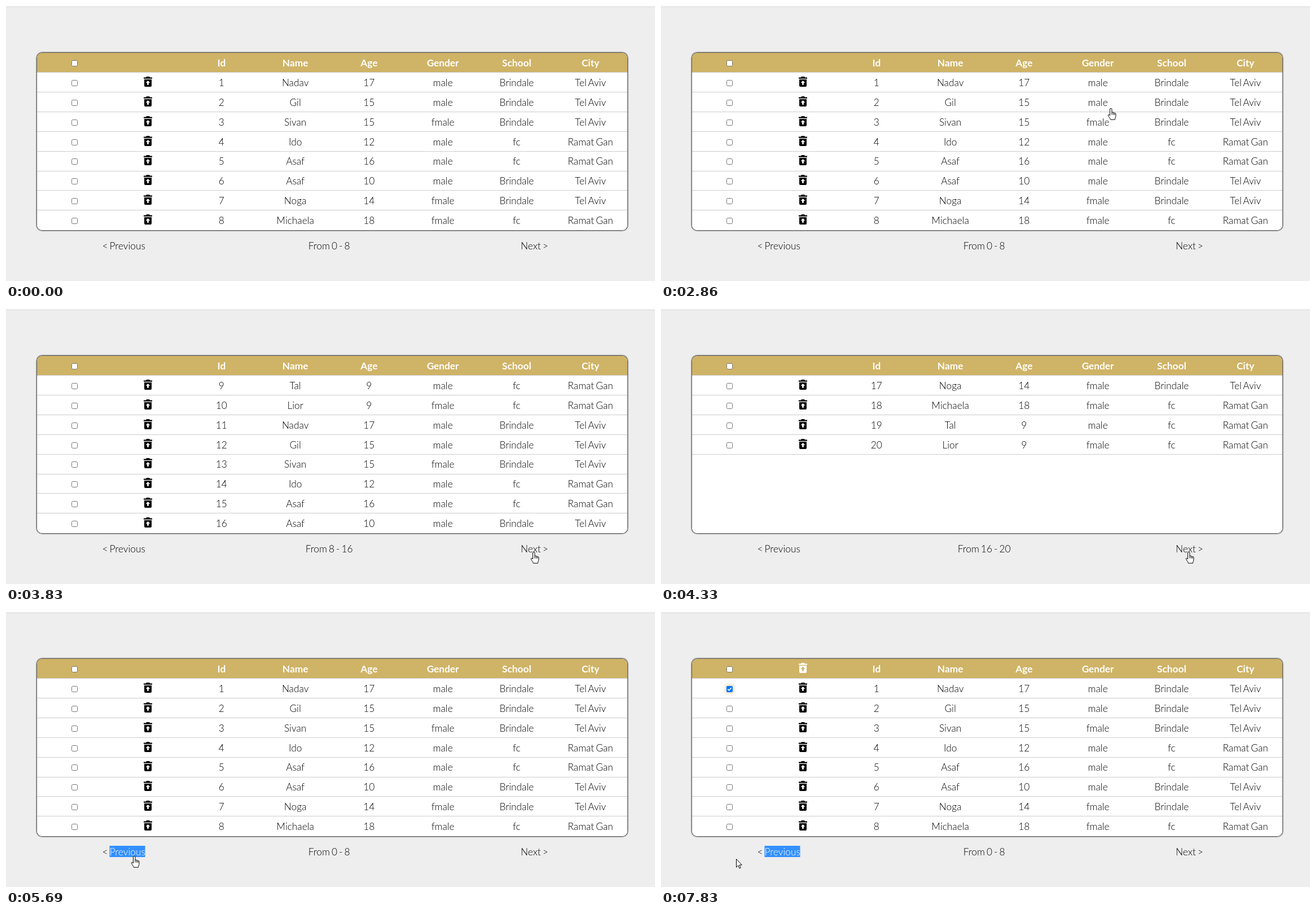
Animation, 1150 px wide and 487 px high, one loop 8000 ms. Source, as an HTML page:

```html
<!DOCTYPE html>
<html lang="en">
<head>
<meta charset="utf-8">
<title>Paged table</title>
<style>
  html, body { margin: 0; width: 100%; height: 100%; overflow: hidden; background: #eee; }
  #frame {
    position: absolute; left: 55px; top: 83px; width: 1046px; height: 314px;
    border-radius: 9px; overflow: hidden; box-shadow: 0 0 2px 1px #222;
    background: linear-gradient(#cfb366 35px, #fff 35px);
  }
  svg {
    position: absolute; left: 0; top: 0; fill: #000;
    font: 300 17.28px Lato, sans-serif; word-spacing: -1.6px;
  }
  .head { font-weight: 700; fill: #fff; }
  .mid { text-anchor: middle; }
  .cursor { fill: #fff; stroke: #000; stroke-linejoin: round; }
</style>
</head>
<body>
<div id="frame"></div>
<svg width="1150" height="487" viewBox="0 0 1150 487">
  <path d="M0 .5H1150" stroke="#f8f8f8"/>
  <path d="M0 1.5H1150" stroke="#dcdcdc"/>
  <g id="table"></g>
  <g id="hand" class="cursor">
    <path d="M-1.5 13V2a1.7 1.7 0 0 1 3.4 0v5.5c.3-1 2.4-.9 2.5.6c.4-.9 2.1-.7 2.3.7c.6-.7 2.2-.3 2.2 1.2v4c0 2.5-1.6 3.5-1.6 6.2H-.6c-.3-2.5-2.9-4.4-4-7.4c-.6-1.7 1.4-2.5 3.1.2z"/>
    <path d="M1.9 7.5v4M4.4 8.1v3.6M6.7 8.8v3.2" fill="none"/>
  </g>
  <path id="arrow" class="cursor" d="M.5.5V15l3.3-3.2 2.2 5.2 2.2-1-2.2-5h4.3z"/>
</svg>
<script>
const LOOP = 8000, PAGE = 8, TOTAL = 20, PITCH = 34.86, COLUMN = 130.75;
const HEADINGS = ['Id', 'Name', 'Age', 'Gender', 'School', 'City'];
const PEOPLE = [
  'Nadav 17 m B', 'Gil 15 m B', 'Sivan 15 f B', 'Ido 12 m', 'Asaf 16 m',
  'Asaf 10 m B', 'Noga 14 f B', 'Michaela 18 f', 'Tal 9 m', 'Lior 9 f'
].map(line => {
  const [name, age, sex, school] = line.split(' ');
  return [name, age, sex === 'm' ? 'male' : 'fmale',
    ...(school ? ['Brindale', 'Tel Aviv'] : ['fc', 'Ramat Gan'])];
});

// start, end, steps, x, y, easing power (0 is smooth, negative eases out), bend x, bend y
const ENTRY = [555, -25];
const MOVES = [
  [700, 990, 4, 762, 92, 1, 0, 0],
  [1180, 1280, 2, 759, 97, 1, 0, 0],
  [2380, 2860, 6, 797, 181, 2, 0, 0],
  [2960, 3150, 3, 917, 394, 1, 0, 0],
  [3250, 3550, 4, 935, 430, -2, 0, 0],
  [4430, 5010, 7, 227, 432, 0, 0, 11],
  [6090, 6860, 9, 123, 143, 0, 0, 0],
  [6960, 7060, 2, 121, 135, 1, 0, 0],
  [7350, 7440, 2, 133, 175, 1, 8, 0],
  [7640, 7830, 3, 133, 437, 1, 12, 0]
];

const $ = id => document.getElementById(id);
const label = (x, y, text, cls = '') => `<text class="mid ${cls}" x="${x}" y="${y}">${text}</text>`;
const columnX = i => 55 + COLUMN * (i + .5);

const icon = (top, color) => `<path fill="${color}" fill-rule="evenodd" transform="translate(251.5 ${top})"
  d="M-7.5 1.5h4l1-1.5h5l1 1.5h4v2.3h-15zM-6.5 5h13v11a2 2 0 0 1-2 2h-9a2 2 0 0 1-2-2zM0 7l-3.8 4h2.4v3.8h2.8v-3.8h2.4z"/>`;

const separator = row =>
  `<rect x="55" y="${Math.floor(117.7 + PITCH * row)}" width="1046" height="1" fill="#ccc"/>`;

function checkbox(y, checked) {
  if (!checked) return `<rect x="116.5" y="${y + .5}" width="10" height="10" rx="2" fill="#fff" stroke="#767676"/>`;
  return `<rect x="113" y="${y - 3}" width="17" height="17" rx="5" fill="#cfb366" opacity=".4" style="filter:blur(2.5px)"/>
    <rect x="116" y="${y}" width="11" height="11" rx="2" fill="#0075ff"/>
    <path d="M118.3 ${y + 5.6}l2.3 2.3 4.2-5" fill="none" stroke="#fff" stroke-width="1.6"/>`;
}

function tableMarkup(page, selected, checked) {
  const first = page * PAGE, last = Math.min(first + PAGE, TOTAL);
  let out = checkbox(96, false) + separator(0);
  out += HEADINGS.map((h, i) => label(columnX(i + 2), 107, h, 'head')).join('');
  if (checked) out += icon(90, '#fff');
  for (let n = first; n < last; n++) {
    const row = n - first, shift = Math.round(row * PITCH);
    out += checkbox(131 + shift, checked && row === 0) + icon(125 + shift, '#000');
    out += [n + 1, ...PEOPLE[n % PEOPLE.length]].map((v, i) => label(columnX(i + 2), 142 + shift, v)).join('');
    if (row < PAGE - 1) out += separator(row + 1);
  }
  if (selected) out += '<rect x="183.5" y="414" width="63" height="20" fill="#3390ff"/>';
  out += `<text x="170.4" y="431">&lt; <tspan fill="${selected ? '#fff' : '#000'}">Previous</tspan></text>`;
  return out + label(572.6, 431, `From ${first} - ${last}`) + label(936.4, 431, 'Next &gt;');
}

function ease(p, power) {
  if (power === 0) return p * p * (3 - 2 * p);
  return power > 0 ? p ** power : 1 - (1 - p) ** -power;
}

// The pointer advances in discrete steps, as in a screen recording.
function pointerAt(t) {
  let [x, y] = ENTRY;
  for (const [start, end, steps, toX, toY, power, bendX, bendY] of MOVES) {
    if (t < start) break;
    const step = Math.min(steps, 1 + Math.floor((t - start) / (end - start) * (steps - 1) + .05));
    const p = ease(step / steps, power), bend = Math.sin(Math.PI * step / steps);
    x += (toX - x) * p + bendX * bend;
    y += (toY - y) * p + bendY * bend;
    if (step < steps) break;
    [x, y] = [toX, toY];
  }
  return [x, y];
}

const within = (x, y, l, t, r, b) => x >= l && x <= r && y >= t && y <= b;

let shown = '';
function draw(now) {
  const t = now % LOOP;
  const page = t < 3830 ? 0 : t < 4330 ? 1 : t < 5200 ? 2 : t < 5690 ? 1 : 0;
  const state = [page, t >= 5500, t >= 7150];
  if (shown !== String(state)) {
    $('table').innerHTML = tableMarkup(...state);
    shown = String(state);
  }
  const [x, y] = pointerAt(t);
  const clickable = within(x, y, 55, 83, 1101, 397) ||
    within(x, y, 171, 412, 247, 436) || within(x, y, 912, 412, 960, 436);
  for (const [id, on] of [['hand', clickable], ['arrow', !clickable]]) {
    $(id).setAttribute('transform', `translate(${Math.round(x)} ${Math.round(y)})`);
    $(id).style.display = on && t >= 700 ? '' : 'none';
  }
}

const begin = performance.now();
function tick() {
  draw(performance.now() - begin);
  requestAnimationFrame(tick);
}
tick();
</script>
</body>
</html>
```
